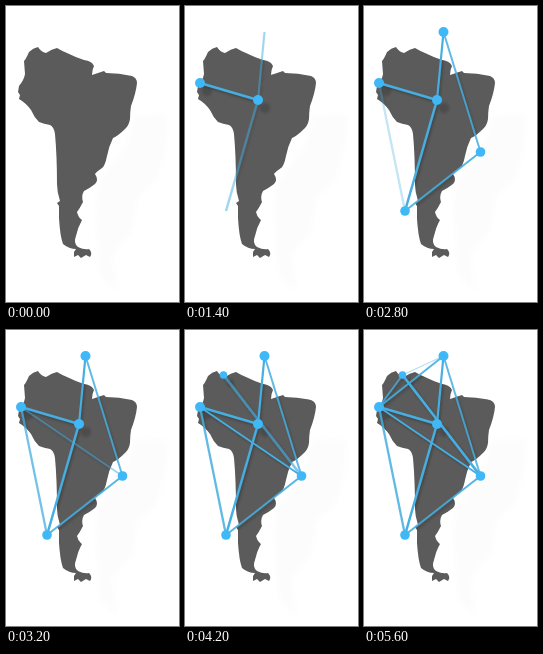
These frames come from a looping animation (173x296 px, 5800 ms). An HTML page:

```html
<!DOCTYPE html>
<html lang="en">
<head>
<meta charset="utf-8">
<title>Connected map</title>
<style>
  html, body { margin: 0; width: 100%; height: 100%; overflow: hidden; background: #fff; }
  svg { display: block; width: 173px; height: 296px; }
</style>
</head>
<body>
<svg viewBox="0 0 173 296">
  <defs>
    <path id="land" d="M18 55 Q20 53 23 46 Q27 42 32 41 Q35 46 40 47 Q46 43 51 42 Q56 45 61 47 Q69 51 78 54
      Q86 55 88 60 Q86 64 86 69 Q92 67 98 65 L100 67 Q113 67 126 70 Q131 72 131 77 Q130 87 125 100
      Q124 106 124 113 Q123 119 120 122 Q112 130 107 132 Q103 140 101 150 Q99 160 96 162 Q90 166 89 168
      Q93 174 89 178 Q84 182 78 185 Q75 190 77 196 Q74 202 71 206 Q72 211 76 214 Q72 221 70 230
      Q67 237 72 241 Q78 244 83 243 Q87 247 84 251 L80 249 75 252 72 249 68 251 68 246 70 243
      Q63 243 57 238 Q54 230 53 212 L53 200 51 197 54 195 Q51 186 51 178 Q51 150 49 128 Q48 121 44 119
      Q38 118 33 116 Q28 111 25 104 Q20 97 13 93 L14 89 12 86 13 80 Q18 74 19 68 Z"/>
    <clipPath id="onLand"><use href="#land"/></clipPath>
    <filter id="haze" x="-20%" y="-20%" width="140%" height="140%"><feGaussianBlur stdDeviation="3"/></filter>
    <filter id="soft" filterUnits="userSpaceOnUse" x="0" y="0" width="173" height="296"><feGaussianBlur stdDeviation="0.8"/></filter>
  </defs>
  <path fill="#fcfcfc" filter="url(#haze)"
    d="M127 110 L162 109 160 140 151 174 132 190 126 225 106 248 112 287 94 270 90 210 91 180 106 160 122 135 Z"/>
  <use href="#land" fill="#5b5b5b"/>
  <g clip-path="url(#onLand)"><g id="shadows" filter="url(#soft)"></g></g>
  <g id="lines"></g>
  <g id="dots"></g>
</svg>
<script>
const LOOP = 5800, STEP = 200;
const BLUE = '#3fb8f7', LINE = '#46aee0', SHADE = '#3c3c3c';

// x, y, radius, fade start, fade end
const nodes = {
  west:   [15, 77, 5, 0, 400],
  center: [73, 94, 5, 600, 1000],
  north:  [79.5, 26, 5, 1600, 2000],
  south:  [41, 205, 4.8, 1600, 2000],
  east:   [116.5, 146, 4.8, 2400, 2800],
  cape:   [38.5, 45, 3.8, 3600, 4200]
};

// from, to, fade start, fade end, final opacity, width
const links = [
  ['west', 'center', 300, 800, 1, 2.5],
  ['center', 'north', 1000, 1800, 1, 2.2],
  ['center', 'south', 1000, 1800, 1, 2.5],
  ['north', 'east', 1900, 2600, .85, 2],
  ['south', 'east', 1900, 2600, .9, 2],
  ['west', 'south', 2500, 3300, .85, 2.3],
  ['west', 'east', 2900, 3500, 1, 2],
  ['cape', 'east', 3800, 4400, 1, 2.8],
  ['cape', 'west', 4300, 4900, .85, 1.8],
  ['cape', 'north', 4300, 4900, .4, 1.3],
  ['west', 'north', 5000, 5600, .9, 2]
];

const fades = [];

function add(parent, tag, attrs, start, end, peak) {
  const el = document.createElementNS('http://www.w3.org/2000/svg', tag);
  for (const key in attrs) el.setAttribute(key, attrs[key]);
  document.getElementById(parent).append(el);
  fades.push({ el, start, end, peak });
}

for (const [from, to, start, end, peak, width] of links) {
  const [x1, y1] = nodes[from], [x2, y2] = nodes[to];
  const line = { x1, y1, x2, y2, 'stroke-width': width };
  add('shadows', 'line', { ...line, stroke: SHADE, transform: 'translate(1.5 2)' }, start, end, peak * .7);
  add('lines', 'line', { ...line, stroke: LINE }, start, end, peak);
}

for (const [cx, cy, r, start, end] of Object.values(nodes)) {
  add('shadows', 'circle', { cx: cx + 7, cy: cy + 8, r, fill: SHADE }, start, end, .5);
  add('dots', 'circle', { cx, cy, r, fill: BLUE }, start, end, 1);
}

function draw(now) {
  const t = Math.floor(now % LOOP / STEP) * STEP;
  for (const { el, start, end, peak } of fades) {
    const progress = Math.min(1, Math.max(0, (t - start) / (end - start)));
    el.setAttribute('opacity', progress * peak);
  }
}

const origin = performance.now();
function tick() {
  draw(performance.now() - origin);
  requestAnimationFrame(tick);
}
tick();
</script>
</body>
</html>
```
